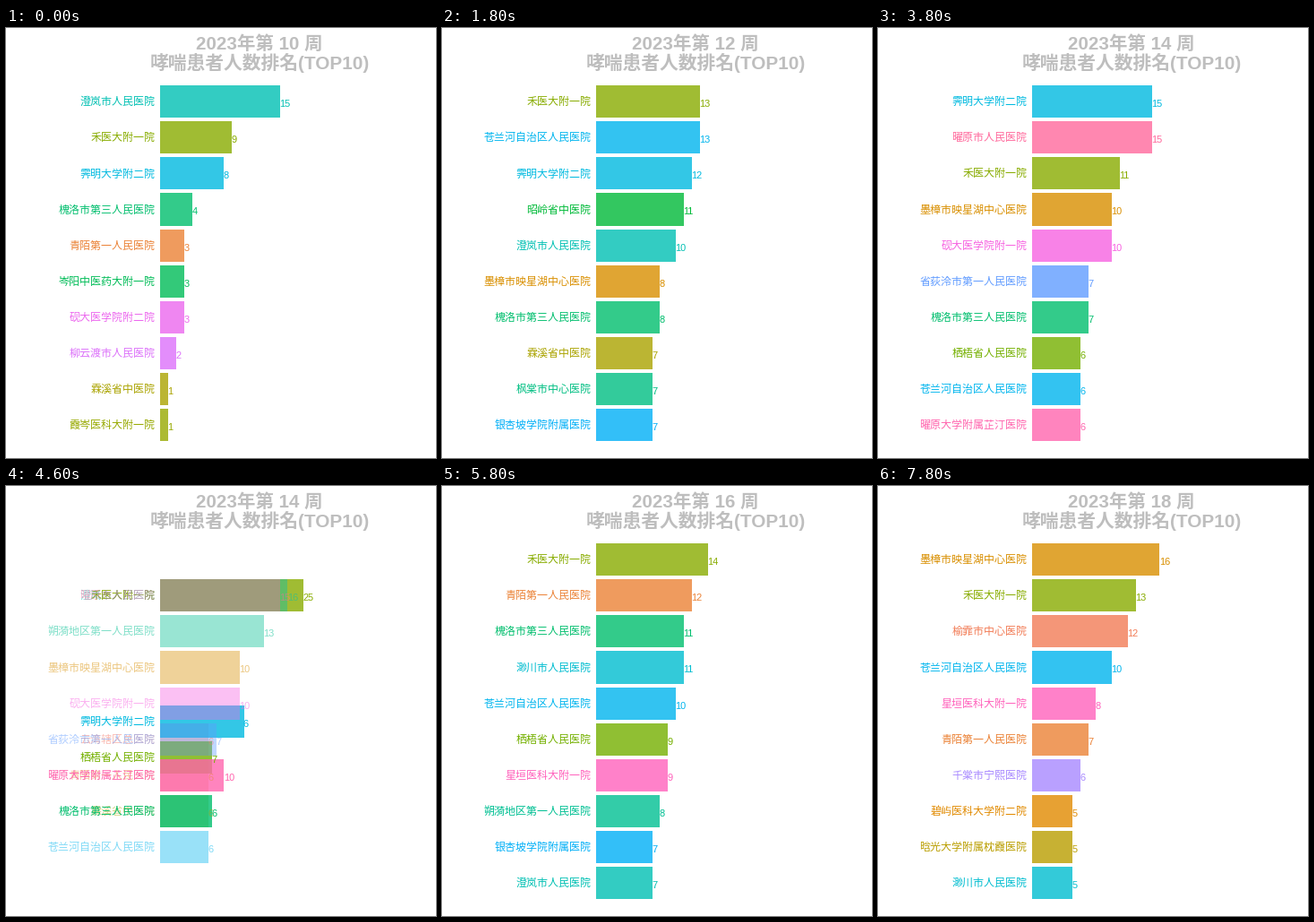
Recreate the animation shown at these times as a matplotlib script. Size 480 px wide and 480 px high, loop 8 s.

```python
import math

import matplotlib.pyplot as plt
from matplotlib.animation import FuncAnimation
from matplotlib.patches import Rectangle

SIZE, DPI = 480, 96
FRAMES, INTERVAL = 40, 200
STEPS = 5                      # frames per week, the last one is a blend
FIRST_WEEK = 10
X0, UNIT = 172.35, 8.88        # bar origin and pixels per patient
Y0, PITCH, BAR_H = 82.2, 40.1, 36.1
FONTS = ["Liberation Sans", "Noto Sans CJK JP"]

# key: (hospital, hue)
HOSPITALS = {
    "A": ("云湾辖区总医院", 17),
    "B": ("榆霏市中心医院", 23),
    "C": ("青陌第一人民医院", 32),
    "D": ("碧屿医科大学附二院", 43),
    "E": ("墨樟市映星湖中心医院", 50),
    "F": ("晗光大学附属枕霞医院", 73),
    "G": ("霖溪省中医院", 83),
    "H": ("霞岑医科大附一院", 93),
    "I": ("禾医大附一院", 100),
    "J": ("栖梧省人民医院", 108),
    "K": ("昭岭省中医院", 135),
    "L": ("岑阳中医药大附一院", 144),
    "M": ("槐洛市第三人民医院", 152),
    "N": ("枫棠市中心医院", 161),
    "O": ("朔漪地区第一人民医院", 169),
    "P": ("澄岚市人民医院", 185),
    "Q": ("渺川市人民医院", 202),
    "R": ("霁明大学附二院", 213),
    "S": ("苍兰河自治区人民医院", 223),
    "T": ("银杏坡学院附属医院", 232),
    "U": ("省荻泠市第一人民医院", 255),
    "V": ("皓庭医院黛溪莺林医院", 264),
    "W": ("千棠市宁熙医院", 273),
    "X": ("柳云渡市人民医院", 296),
    "Y": ("砚大医学院附二院", 307),
    "Z": ("砚大医学院附一院", 317),
    "a": ("星垣医科大附一院", 339),
    "b": ("曜原大学附属芷汀医院", 346),
    "c": ("曜原市人民医院", 355),
    "d": ("绮岭医科大学附属医院", 361),
}

# one line per week, in order of rank
WEEKS = [
    "P15 I9 R8 M4 C3 L3 Y3 X2 G1 H1",
    "I19 R14 P11 K9 M8 C7 G6 N5 Y5 X4",
    "I13 S13 R12 K11 P10 E8 M8 G7 N7 T7",
    "P20 C16 I15 E9 R8 S8 M7 N7 Q7 G6",
    "R15 c15 I11 E10 Z10 U7 M7 J6 S6 b6",
    "I25 P16 O13 b10 J7 A6 C6 G6 M6 R6",
    "I14 C12 M11 Q11 S10 J9 a9 O8 T7 P7",
    "a13 d13 I11 M10 Q10 C9 T9 O8 S8 V8",
    "E16 I13 B12 S10 a8 C7 W6 D5 F5 Q5",
]


def parse(line):
    """Map each key to its (rank, count)."""
    return {s[0]: (rank, int(s[1:])) for rank, s in enumerate(line.split())}


def hcl(hue, chroma=100, lum=65):
    """Polar LUV to sRGB, clipped to the gamut."""
    un, vn = 0.1978398, 0.4683363
    angle = math.radians(hue)
    y = ((lum + 16) / 116) ** 3
    u = chroma * math.cos(angle) / (13 * lum) + un
    v = chroma * math.sin(angle) / (13 * lum) + vn
    x = 9 * y * u / (4 * v)
    z = -x / 3 - 5 * y + 3 * y / v
    linear = (
        3.240479 * x - 1.537150 * y - 0.498535 * z,
        -0.969256 * x + 1.875992 * y + 0.041556 * z,
        0.055648 * x - 0.204043 * y + 1.057311 * z,
    )

    def gamma(c):
        c = 1.055 * c ** (1 / 2.4) - 0.055 if c > 0.00304 else 12.92 * c
        return min(max(c, 0), 1)

    return tuple(gamma(c) for c in linear)


TABLES = [parse(line) for line in WEEKS]
COLORS = {key: hcl(hue) for key, (_, hue) in HOSPITALS.items()}


def bars_at(frame):
    """Return the week index and a list of (key, rank, count, label, alpha)."""
    week, step = divmod(frame + 1, STEPS)
    now = TABLES[week]
    if step < STEPS - 1:
        return week, [(k, r, n, n, 1) for k, (r, n) in now.items()]
    after = TABLES[week + 1]
    bars = []
    for key in sorted(now.keys() | after.keys()):
        r0, n0 = now.get(key) or after[key]
        r1, n1 = after.get(key) or now[key]
        alpha = 1 if key in now and key in after else 0.5
        bars.append((key, (r0 + r1) / 2, (n0 + n1) / 2, n1, alpha))
    return week, bars


fig = plt.figure(figsize=(SIZE / DPI, SIZE / DPI), dpi=DPI, facecolor="white")
ax = fig.add_axes([0, 0, 1, 1])


def put(x, y, text, px, **style):
    ax.text(x, y, text, fontsize=px * 72 / DPI, family=FONTS,
            va="baseline", **style)


def draw(frame):
    ax.clear()
    ax.set(xlim=(0, SIZE), ylim=(SIZE, 0))
    ax.axis("off")

    week, bars = bars_at(frame)
    title = dict(ha="center", weight="bold", color="#bebebe")
    put(283, 24, f"2023年第 {FIRST_WEEK + week} 周", 20.5, **title)
    put(283.5, 46, "哮喘患者人数排名(TOP10)", 20.8, **title)

    for key, rank, count, label, alpha in bars:
        color = COLORS[key]
        y = Y0 + rank * PITCH
        end = X0 + count * UNIT
        left, right = round(X0), round(end)
        top, bottom = round(y - BAR_H / 2), round(y + BAR_H / 2)
        ax.add_patch(Rectangle((left, top), right - left, bottom - top,
                               color=color, alpha=0.8 * alpha, linewidth=0))
        put(166.5, y + 4, HOSPITALS[key][0], 12, ha="right",
            color=color, alpha=alpha)
        put(end - 0.6, y + 6, str(label), 11, ha="left",
            color=color, alpha=alpha)


anim = FuncAnimation(fig, draw, frames=FRAMES, interval=INTERVAL,
                     repeat=True, repeat_delay=0)
plt.show()
```
